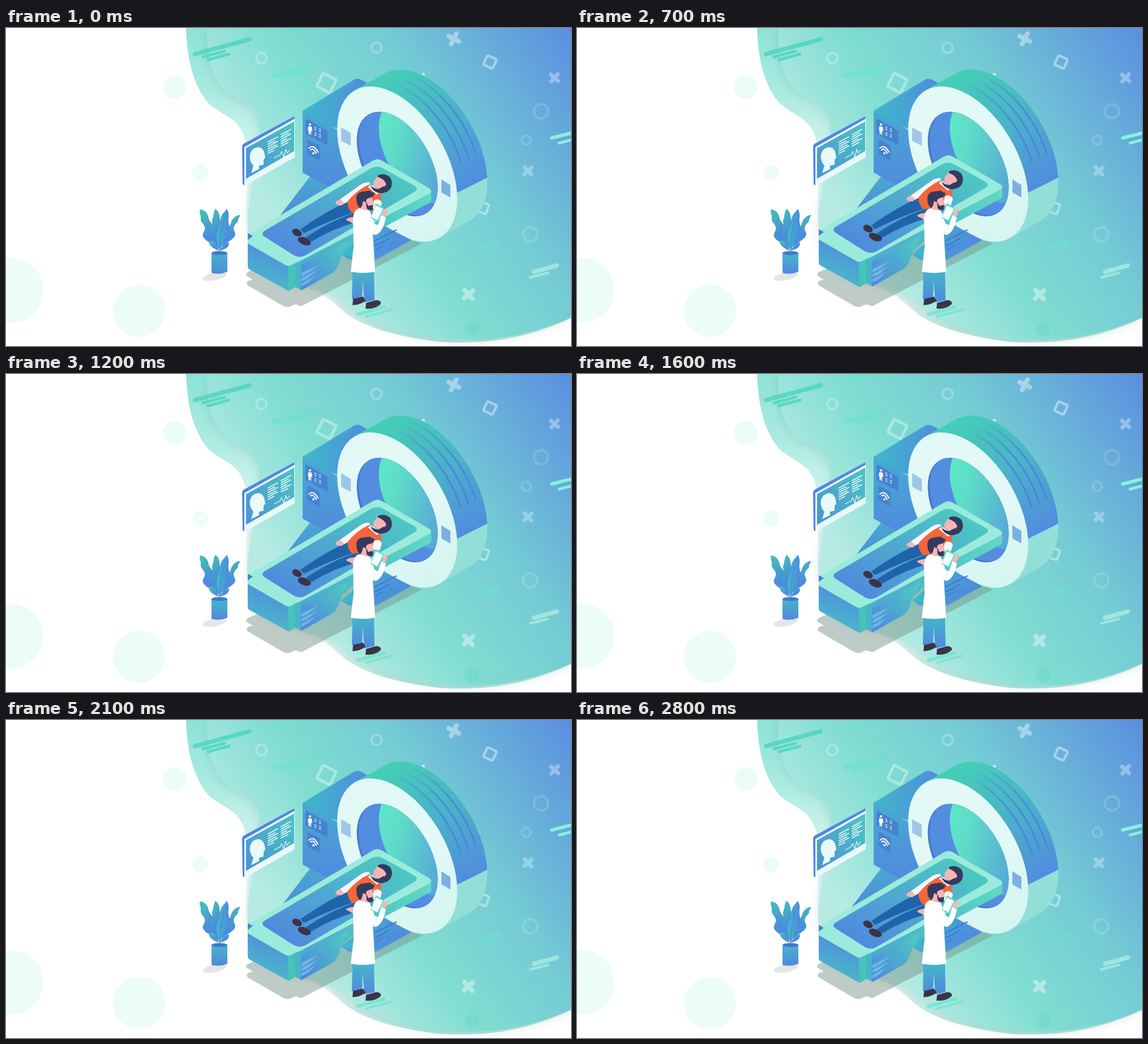
Recreate the animation shown at these times as an HTML page. Size 998x561 px, loop 2900 ms.

```html
<!DOCTYPE html>
<html lang="en">
<head>
<meta charset="utf-8">
<title>Scanner room</title>
<style>
  html, body { margin: 0; width: 100%; height: 100%; overflow: hidden; background: #fff; }
  svg { display: block; width: 998px; height: 561px; }
  .line { fill: none; stroke-linecap: round; stroke-linejoin: round; }
</style>
</head>
<body>
<svg viewBox="0 0 998 561">
  <defs>
    <linearGradient id="sky" gradientUnits="userSpaceOnUse" x1="479" y1="339" x2="986" y2="-13">
      <stop stop-color="#b6ebe4"/><stop offset=".28" stop-color="#80ddd1"/><stop offset=".56" stop-color="#74cbd4"/><stop offset="1" stop-color="#5a8fe0"/>
    </linearGradient>
    <linearGradient id="fringe" x1="0" y1="0" x2="0" y2="1">
      <stop stop-color="#8de2d6"/><stop offset=".2" stop-color="#aaeae1"/><stop offset=".35" stop-color="#c9f2ec"/><stop offset=".55" stop-color="#e0f7f4"/><stop offset=".85" stop-color="#dcf3ef"/><stop offset="1" stop-color="#a9e4da"/>
    </linearGradient>
    <linearGradient id="down" x1="0" y1="0" x2="0" y2="1">
      <stop stop-color="#45b6c8"/><stop offset="1" stop-color="#5088de"/>
    </linearGradient>
    <linearGradient id="up" x1="0" y1="1" x2=".3" y2="0">
      <stop stop-color="#48c4c4"/><stop offset="1" stop-color="#4f8ddd"/>
    </linearGradient>
    <linearGradient id="across" x1="0" y1="0" x2="1" y2="0">
      <stop stop-color="#40b9ca"/><stop offset="1" stop-color="#5088de"/>
    </linearGradient>
    <linearGradient id="pad" x1="0" y1="1" x2="1" y2="0">
      <stop offset=".1" stop-color="#5089de"/><stop offset=".9" stop-color="#4dc9c1"/>
    </linearGradient>
    <linearGradient id="display" x1="0" y1="1" x2="1" y2="0">
      <stop stop-color="#4a93d6"/><stop offset="1" stop-color="#4dc4c0"/>
    </linearGradient>
    <linearGradient id="leaf" x1="0" y1="0" x2=".3" y2="1">
      <stop stop-color="#3fc6b6"/><stop offset=".7" stop-color="#4a8fda"/><stop offset="1" stop-color="#5088de"/>
    </linearGradient>
    <linearGradient id="shell" gradientUnits="userSpaceOnUse" x1="-10" y1="-150" x2="130" y2="-10">
      <stop stop-color="#45cdb8"/><stop offset=".5" stop-color="#4bb0ca"/><stop offset="1" stop-color="#518be0"/>
    </linearGradient>
    <linearGradient id="groove" gradientUnits="userSpaceOnUse" x1="-30" y1="-110" x2="60" y2="-70">
      <stop stop-color="#4a8bd8" stop-opacity="0"/><stop offset="1" stop-color="#4a87da"/>
    </linearGradient>
    <linearGradient id="ring" x1="0" y1="0" x2="1" y2="1">
      <stop stop-color="#e0f9f5"/><stop offset=".5" stop-color="#e4f9f7"/><stop offset="1" stop-color="#cdf3ed"/>
    </linearGradient>
    <linearGradient id="bore" x1="0" y1=".5" x2=".9" y2=".75">
      <stop stop-color="#5ee6c8"/><stop offset=".25" stop-color="#5edbc8"/><stop offset="1" stop-color="#5599da"/>
    </linearGradient>
    <linearGradient id="rim" gradientUnits="userSpaceOnUse" x1="520" y1="420" x2="750" y2="290">
      <stop stop-color="#4ca8d0"/><stop offset=".55" stop-color="#50c3c5"/><stop offset="1" stop-color="#62d9c5"/>
    </linearGradient>
    <clipPath id="hole"><circle r="82.5"/></clipPath>
    <clipPath id="upper"><path d="M560 40H870V254L796 291 691 240 580 200Z"/></clipPath>
    <filter id="soft" x="-20%" y="-20%" width="140%" height="140%"><feGaussianBlur stdDeviation="8"/></filter>
    <path id="cross" class="line" d="M-6-6 6 6M6-6-6 6" stroke="#fff" stroke-width="7"/>
    <path id="hull" d="M-86.6-86.6-23.4-149.2A122.5 122.5 0 0 1 149.8 24L86.6 86.6A122.5 122.5 0 0 1-86.6-86.6Z" transform="matrix(.866 .5 0 1 691 240)"/>
    <path id="blob" d="M355 0C355 55 362 96 398 119C431 133 448 149 447 182C446 220 437 255 431 300C420 365 430 425 500 444C545 455 575 468 605 490C645 521 700 538 765 547C850 556 925 543 998 511V0Z"/>
    <path id="groove-arc" class="line" d="M-27-119.5A122.5 122.5 0 0 1 111-51.8" stroke="url(#groove)" stroke-width="4.5"/>
  </defs>

  <!-- backdrop -->
  <g fill="#ecfcf9">
    <circle cx="298" cy="104" r="21"/><circle cx="343" cy="255" r="14"/>
    <circle cx="9" cy="463" r="57"/><circle cx="235" cy="499" r="46"/>
  </g>
  <path d="M318 0C320 56 331 103 359 134C386 157 414 158 423 201C430 242 425 280 425 330C425 400 450 440 520 455C560 463 574 481 600 503C640 532 700 545 760 553C850 560 925 546 998 512V0Z" fill="url(#fringe)"/>
  <use href="#blob" fill="#537d7d" opacity=".15" filter="url(#soft)" x="-2" y="4"/>
  <use href="#blob" fill="url(#sky)"/>

  <!-- scattered marks -->
  <g class="line" stroke="#fff">
    <g stroke-width="4" opacity=".25">
      <circle cx="451" cy="53" r="9"/><circle cx="654.5" cy="35" r="9"/>
    </g>
    <g stroke-width="4" opacity=".16">
      <circle cx="945" cy="147" r="12.5"/><circle cx="919" cy="198" r="8"/><circle cx="926" cy="364" r="12.5"/>
    </g>
    <rect x="-13" y="-13" width="26" height="26" rx="2" stroke-width="5" opacity=".36" transform="translate(566 97)rotate(27)"/>
    <rect x="-9" y="-9" width="18" height="18" rx="2" stroke-width="4.5" opacity=".42" transform="translate(855 60)rotate(25)"/>
    <rect x="-9" y="-9" width="18" height="18" rx="2" stroke-width="4" opacity=".42" transform="translate(842 317)rotate(20)"/>
  </g>
  <use href="#cross" opacity=".4" transform="translate(791 19)rotate(-18)scale(1.2)"/>
  <use href="#cross" opacity=".34" transform="translate(969 88)rotate(-3)"/>
  <use href="#cross" opacity=".3" transform="translate(922 252)rotate(3)"/>
  <use href="#cross" opacity=".4" transform="translate(817 470)rotate(3)scale(1.2)"/>
  <circle cx="823" cy="531" r="13" fill="#64d4c2" opacity=".3"/>
  <circle cx="737" cy="82" r="3" fill="#fff" opacity=".6"/>
  <g class="line">
    <g stroke="#4fd6bd" opacity=".85"><path d="M334 46 430 20" stroke-width="8"/><path d="M348 51 386 41M357 56 394 46" stroke-width="5"/></g>
    <g stroke="#6be3cd" opacity=".7">
      <path d="M486 9 530-3M473 84 541 67" stroke-width="7"/><path d="M525 9 570-3M487 87 526 78" stroke-width="5"/>
      <path d="M834 387 869 378M621 505 668 492" stroke-width="6"/><path d="M843 393 865 387M636 509 681 497" stroke-width="4"/>
    </g>
    <g stroke="#86f2dc"><path d="M964 194 1000 185" stroke-width="6"/><path d="M977 203 1000 197" stroke-width="5"/></g>
    <g stroke="#a8eadf" opacity=".85"><path d="M933 430 973 419" stroke-width="8"/><path d="M926 440 957 432" stroke-width="4.5"/></g>
  </g>

  <!-- wall screen -->
  <path d="M417 209Q417 206 420 204L505 158 509 156 510 162 421 212V278L418 275Z" fill="#5186e0"/>
  <path d="M421 210 510 160V228L424 277Q421 278 421 275Z" fill="#eaf7fb"/>
  <path d="M424 212 509 165V217L424 266Z" fill="url(#display)"/>
  <path d="M433 256 437 243Q429 234 431 223 434 211 446 210 456 212 457 223L458 229 455 232 455 241 447 243 447 249Z" fill="#eafafa"/>
  <g class="line" stroke="#e6fafa" stroke-width="1.7">
    <path d="M463 201 480 192M463 205 475 199M463 209 480 200M463 213 477 206M463 217 480 208M463 221 473 216"/>
    <path d="M486 188 503 179M486 192 499 185M486 196 503 187M486 200 496 195M486 204 503 195M486 208 498 202"/>
    <path d="M474 229 484 224 487 218 491 228 494 214 497 221 501 215" stroke-width="1.2"/>
  </g>

  <!-- machine cabinet -->
  <path d="M524 146 615 91Q621 88 627 91L650 104 600 182 562 170Z" fill="url(#across)"/>
  <path d="M524 146 592 184 625 290 580 286 524 255Z" fill="url(#down)"/>
  <path d="M524 146 592 184 625 290 580 286 524 255Z" fill="#5088de" opacity=".25"/>
  <path d="M531 160 568 182V207L529 187V162ZM533 197 554 208V235L532 222Z" fill="#4583d0"/>
  <circle cx="537" cy="170" r="2" fill="#fff"/>
  <path d="M534 173 540 174 541 182 539 181 539 189 537.5 188V182L536 188 534.5 187V180L533 181Z" fill="#fff"/>
  <path d="M544 174 548 176M544 178 548 180M547 174V181M552 177 556 179M552 181 556 183M555 177V184M544 184 548 186M544 188 548 190M547 184V191M552 187 556 189M552 191 556 193M555 187V194" stroke="#fff" fill="none" opacity=".7"/>
  <g class="line" stroke="#fff" stroke-width="2"><path d="M535 212Q543 204 551 219M538 215Q543 211 548 221"/><circle cx="543" cy="221" r="1"/></g>
  <path d="M478 339 537 262 580 285V330Z" fill="url(#down)"/>
  <path d="M478 339 537 262 580 285V330Z" fill="#5088de" opacity=".3"/>

  <!-- floor shadow -->
  <path d="M425 437Q422 434 428 430L440 425 600 360 720 375 735 380 525 489Q520 492 514 488 509 487 503 491 497 494 489 490L427 454Q423 450 428 446L436 444Z" fill="#789289" opacity=".48"/>

  <!-- scanner ring -->
  <use href="#hull" fill="#92dfd8"/>
  <g clip-path="url(#upper)">
    <use href="#hull" fill="url(#shell)"/>
    <use href="#groove-arc" transform="matrix(.866 .5 0 1 707 231)"/>
    <use href="#groove-arc" transform="matrix(.866 .5 0 1 720 223)"/>
    <use href="#groove-arc" transform="matrix(.866 .5 0 1 733 216)"/>
  </g>
  <g transform="matrix(.866 .5 0 1 691 240)">
    <circle r="122.5" fill="url(#ring)"/>
    <circle r="82.5" fill="#4679d2"/>
    <g clip-path="url(#hole)">
      <circle cx="4" cy="-4" r="82.5" fill="#538de0"/>
      <circle cx="45" cy="-45" r="82.5" fill="url(#bore)"/>
    </g>
  </g>
  <path d="M592 175 609 185V208L592 199Z" fill="#9fc6e7"/>
  <path d="M769 267 785 277V299L769 290Z" fill="#7eafe3"/>

  <!-- pedestal -->
  <path d="M592 399 660 345 716 374 655 407 604 407Z" fill="url(#across)"/>
  <path d="M592 399 610 405 650 380 716 374 655 409 606 409Z" fill="#4f89df" opacity=".5"/>
  <path d="M650 376 690 356M652 384 677 371M653 392 665 385" stroke="#4478cf" stroke-width="2" fill="none"/>

  <!-- table and patient -->
  <g id="table">
    <path d="M427 375 499 417V464L430 426Q427 424 427 420Z" fill="url(#up)"/>
    <path d="M520 408 751 288V304Q751 307 747 309L616 379 600 394Q592 399 589 413 585 427 575 433L522 463Z" fill="url(#rim)"/>
    <path d="M520 420 608 374Q600 390 594 399 591 405 588 414 584 428 575 433L520 463Z" fill="url(#pad)"/>
    <path d="M522 432 553 418 533 433 522 439ZM522 441 550 427 533 442 522 447ZM522 450 547 437 533 450 522 456Z" fill="#7bc2e7" opacity=".75"/>
    <path d="M498 416 510 413 521 405V462L511 457 499 464Z" fill="#46b7c8"/>
    <path d="M498 416 510 413V458L499 464Z" fill="#48c3ba"/>
    <path d="M427 374 434 367 428 364 648 234Q656 229 664 234L748 283Q754 287 748 292L522 410 510 415 502 419Q498 421 493 418L427 380Z" fill="#9aebdb"/>
    <path d="M427 362 436 367 427 374Z" fill="#4a80d8"/>
    <path d="M458 369Q448 363 458 357L644 248Q655 242 665 247L721 278Q731 284 720 290L529 401Q518 407 507 400Z" fill="url(#pad)"/>

    <path d="M604 307Q572 319 520 355L526 362Q566 342 612 326ZM612 327Q570 342 530 369L539 377Q580 352 622 342L628 322Z" fill="#1f64aa"/>
    <g fill="#3b3449">
      <ellipse cx="514" cy="361" rx="9" ry="6" transform="rotate(28 514 361)"/>
      <ellipse cx="527" cy="376" rx="12" ry="6.5" transform="rotate(22 527 376)"/>
    </g>
    <path d="M642 272Q633 271 624 278L589 303 593 312 610 303 644 286Z" fill="#f6f7fc"/>
    <path d="M592 303Q582 304 582 309 583 313 593 313L597 309Z" fill="#f7b4b5"/>
    <path d="M603 306Q620 286 641 276L651 288 663 294 662 307 650 321 612 327Q603 319 603 306Z" fill="#f4653c"/>
    <path d="M650 304Q660 299 664 309L660 321 646 319Z" fill="#f6f7fc"/>
    <path d="M639 280 646 277 662 289 655 294Z" fill="#f6f7fc"/>
    <path d="M649 271 657 261Q669 263 672 272L670 283 660 286 649 278Z" fill="#f7b4b5"/>
    <path d="M657 260Q668 255 678 263 685 273 679 284L672 290 668 280 672 276Q668 266 657 263Z" fill="#343a5d"/>
    <path d="M644 278Q651 284 658 284L667 279 673 287Q668 293 658 291 647 288 644 278Z" fill="#343a5d"/>
    <path d="M616 333Q606 334 601 337 601 340 606 341L614 346Z" fill="#f7b4b5"/>
  </g>

  <!-- doctor -->
  <path d="M612 428H650L651 480 633 484 630 445 629 479 611 478Z" fill="url(#down)"/>
  <path d="M613 478 631 474 635 481Q627 488 612 489ZM636 485 654 480Q664 481 662 487 651 497 635 495Z" fill="#3b3449"/>
  <path d="M613 338Q614 318 626 318L642 321 651 345 657 348 663 330 671 334Q667 356 657 363 652 367 648 363L652 430Q630 434 609 430L614 386Z" fill="#fff"/>
  <path d="M651 347 655 352 649 361" class="line" stroke="#dce8f0"/>
  <path d="M628 304 637 301 646 298 650 312 642 323 626 319Z" fill="#f7b4b5"/>
  <path d="M619 303Q617 289 634 288L643 287 647 290 651 291Q650 299 641 300L637 302 635 308 631 305 629 313 626 318Q619 313 619 303Z" fill="#343a5d"/>
  <path d="M636 306 640 314 648 312 648 320Q643 324 637 318Z" fill="#343a5d"/>
  <path d="M653 309 668 318 657 342 644 335Z" fill="#64d8c5"/>
  <path d="M653 313 666 319 656 339 645 334Z" fill="#f6fbfd"/>
  <path d="M664 331 668 320 674 319 673 327 669 333Z" fill="#f7b4b5"/>

  <!-- plant -->
  <ellipse cx="369" cy="438" rx="22" ry="7" fill="#e4e5e6" transform="rotate(-12 369 438)"/>
  <g fill="url(#leaf)">
    <path d="M375 388C366 380 352 377 348 368C346 361 353 358 351 351C349 344 343 343 344 335C345 329 340 326 343 320C353 321 357 329 358 336C359 342 366 345 366 352C367 360 369 372 376 384Z"/>
    <path d="M379 388C388 378 404 373 405 364C405 358 400 356 403 350C405 344 411 343 410 337L414 330C404 330 399 338 397 345C396 350 390 352 389 358C388 367 384 376 379 384Z"/>
    <path d="M376 390C364 375 360 362 364 354C367 348 362 343 365 336C367 330 366 325 370 319C378 325 377 333 378 340C380 350 382 372 378 390Z"/>
    <path d="M376 393Q358 386 358 376 366 373 371 382ZM378 393Q384 379 394 378 395 386 386 390Z"/>
  </g>
  <path d="M377 392C370 376 371 360 376 352C380 345 376 340 380 333C382 327 386 325 390 319C396 329 392 335 393 342C394 350 398 358 391 366C385 373 381 380 379 392Z" fill="url(#across)"/>
  <path d="M377 394Q377 366 385 338" class="line" stroke="#4780d5"/>
  <path d="M363 397H391V430Q377 436 363 432Z" fill="url(#down)"/>
  <ellipse cx="377" cy="397" rx="14" ry="3.5" fill="#4378cb"/>
</svg>
<script>
const LOOP = 2900, PEAK = 1200, STEP = 100, LIFT = 9.7;
const table = document.getElementById('table');
const easeOut = (p, bend) => p + bend * p * (1 - p);

function lift(t) {
  return t < PEAK
    ? LIFT * easeOut(t / PEAK, 0.6)
    : LIFT * (1 - easeOut((t - PEAK) / (LOOP - PEAK), 0.3));
}

function draw() {
  const t = Math.floor(performance.now() % LOOP / STEP) * STEP;
  table.setAttribute('transform', `translate(0 ${-lift(t).toFixed(2)})`);
  requestAnimationFrame(draw);
}
draw();
</script>
</body>
</html>
```
